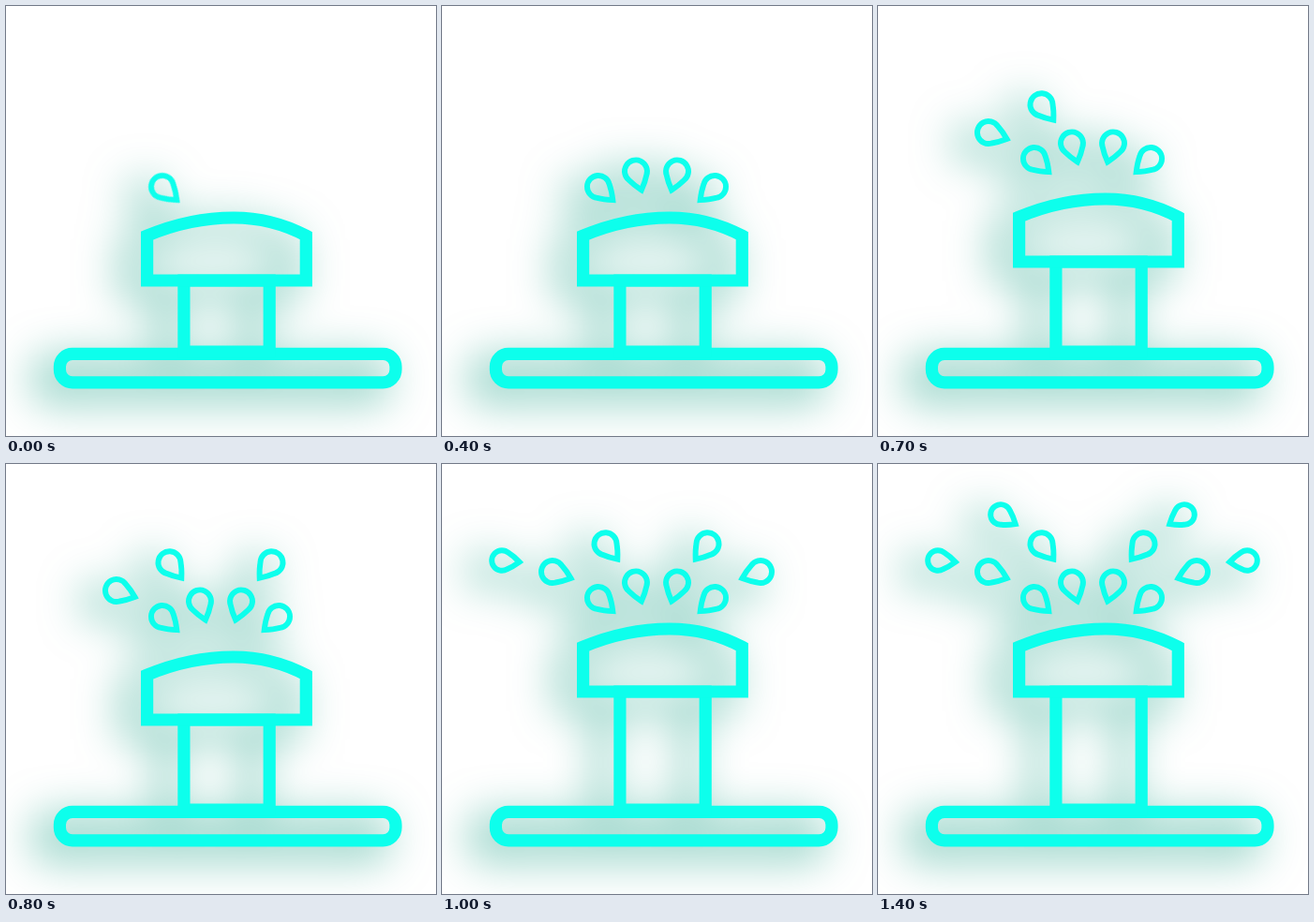
These frames come from a looping animation (459 px wide and 459 px high, 1.5 s). An HTML page:

```html
<!DOCTYPE html>
<html lang="en">
<head>
<meta charset="utf-8">
<title>Fountain</title>
<style>
  html, body { margin: 0; width: 100%; height: 100%; overflow: hidden; background: #fff; }
  svg { display: block; width: 100%; height: 100%; }
</style>
</head>
<body>
<svg viewBox="0 0 459 459">
  <filter id="glow" filterUnits="userSpaceOnUse" x="-80" y="-80" width="620" height="620"
          color-interpolation-filters="sRGB">
    <feMorphology in="SourceAlpha" operator="dilate" radius="3"/>
    <feGaussianBlur stdDeviation="23"/>
    <feOffset dx="-18" dy="12" result="soft"/>
    <feFlood flood-color="#009578" flood-opacity=".5"/>
    <feComposite in2="soft" operator="in" result="shadow"/>
    <feMerge>
      <feMergeNode in="shadow"/>
      <feMergeNode in="SourceGraphic"/>
    </feMerge>
  </filter>
  <g filter="url(#glow)" fill="none" stroke="#0dffec" stroke-width="13.2">
    <rect x="57.4" y="371.4" width="358.6" height="30.4" rx="13.5"/>
    <path id="stem"/>
    <path id="head" d="M150.6 293V245.2Q196 226 243 226Q284 226 320.3 245.2V293Z"/>
    <g id="drops" stroke-width="5.9"></g>
  </g>
</svg>
<script>
const LOOP = 1500, STAGE = 500, STEP = 100;
const AXIS = 229;
const DROP = 'M20.8 0Q13.3 6.4 7 9.7A12 12 0 1 1 7 -9.7Q13.3 -6.4 20.8 0Z';

// Height of the head and of the spray in each stage
const HEAD = [0, 20, 50];
const SPRAY = [0, 30, 50];

// Each ring: the height its drops point at, and the two drops right of the axis
const rings = [
  { focus: 250, side: [62, 193], top: [22, 176.5] },
  { focus: 175, side: [111, 135], top: [54.5, 105.3] },
  { focus: 117, side: [165, 103], top: [98, 54] }
];

const $ = id => document.getElementById(id);
const mirror = ([x, y]) => [-x, y];
const lift = (el, dy) => el.setAttribute('transform', `translate(0 ${-dy})`);

function make(tag, parent) {
  return parent.appendChild(document.createElementNS('http://www.w3.org/2000/svg', tag));
}

const drops = [];
const groups = rings.map(({ focus, side, top }, ring) => {
  const group = make('g', $('drops'));
  const scale = ring < 2 ? 1 : 0.9;
  [mirror(side), mirror(top), top, side].forEach(([x, y], k) => {
    const el = make('path', group);
    const angle = Math.atan2(focus - y, -x) * 180 / Math.PI;
    el.setAttribute('d', DROP);
    el.setAttribute('vector-effect', 'non-scaling-stroke');
    el.setAttribute('transform', `translate(${AXIS + x} ${y}) rotate(${angle}) scale(${scale})`);
    // The first drop of a ring stays alone for one extra step
    drops.push({ el, at: ring * STAGE + (k && k + 1) * STEP });
  });
  return group;
});

let shown = -1;

function draw(t) {
  const step = Math.floor(t / STEP);
  if (step === shown) return;
  shown = step;

  const stage = Math.floor(t / STAGE);
  lift($('head'), HEAD[stage]);
  $('stem').setAttribute('d', `M189.9 369V${293 - HEAD[stage]}H281.2V369Z`);
  groups.forEach((g, ring) => lift(g, SPRAY[stage] - SPRAY[ring]));
  for (const { at, el } of drops) el.style.display = at <= t ? '' : 'none';
}

const start = performance.now();

function tick() {
  draw((performance.now() - start) % LOOP);
  requestAnimationFrame(tick);
}
tick();
</script>
</body>
</html>
```
